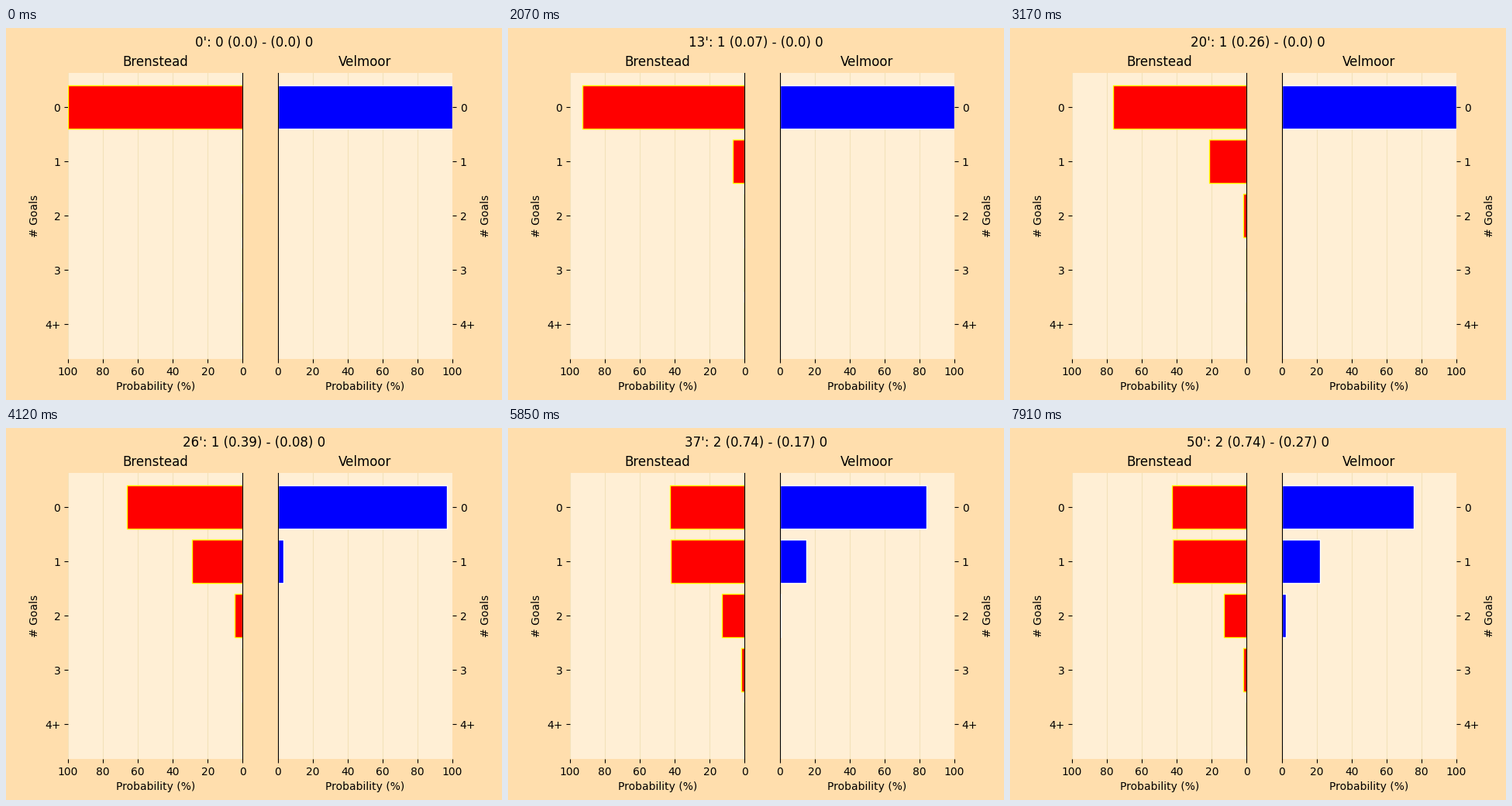
Recreate the animation shown at these times as a matplotlib script. Size 640x480 px, loop 8000 ms.

```python
import numpy as np
import matplotlib.pyplot as plt
from matplotlib.animation import FuncAnimation

LOOP, STEP = 8000, 20
QUIET, TWEEN, PARTS = 160, 30, 5   # ms per quiet minute, ms per tween step
ROWS = 5

# (minute, side, chance, scored)
SHOTS = [
    (10, 0, 0.070, True),
    (16, 0, 0.061, False),
    (18, 0, 0.126, False),
    (24, 0, 0.133, False),
    (24, 1, 0.020, False),
    (26, 1, 0.060, False),
    (28, 0, 0.354, True),
    (36, 1, 0.087, False),
    (42, 1, 0.018, False),
    (46, 1, 0.0835, False),
]
BUSY = {shot[0] for shot in SHOTS}


def goal_odds(minute, side):
    """Chance in percent of 0, 1, 2, 3 and 4+ goals up to a minute."""
    odds = np.array([1.0])
    for m, s, p, _ in SHOTS:
        if s == side and m <= minute:
            odds = np.convolve(odds, [1 - p, p])
    odds = np.pad(odds, (0, ROWS))
    return 100 * np.append(odds[:ROWS - 1], odds[ROWS - 1:].sum())


def tally(minute, side):
    shots = [s for s in SHOTS if s[1] == side and s[0] <= minute]
    goals = sum(s[3] for s in shots)
    return goals, round(sum((s[2] for s in shots), 0.0), 2)


def clock(ms):
    """Minute of play and the share of its tween that is done."""
    minute = 0
    while True:
        length = TWEEN * PARTS if minute in BUSY else QUIET
        if ms < length:
            part = ms // TWEEN + 1 if minute in BUSY else PARTS
            return minute, part / PARTS
        ms -= length
        minute += 1


def style(ax, name, inner, outer):
    ax.set_facecolor("papayawhip")
    ax.set_title(name)
    ax.set_xlabel("Probability (%)")
    ax.set_ylabel("# Goals")
    ax.set_yticks(range(ROWS), ["0", "1", "2", "3", "4+"])
    ax.set_ylim(4.64, -0.64)
    ax.set_xlim((100, 0) if inner == "right" else (0, 100))
    ax.set_xticks(range(0, 101, 20))
    ax.yaxis.set_label_position(outer)
    ax.yaxis.set_ticks_position(outer)
    ax.set_axisbelow(True)
    ax.grid(axis="x", color="#f3e2b9")
    for side, spine in ax.spines.items():
        spine.set_visible(side == inner)


fig, axes = plt.subplots(1, 2, figsize=(6.4, 4.8), dpi=100,
                         facecolor="navajowhite")
style(axes[0], "Brenstead", "right", "left")
style(axes[1], "Velmoor", "left", "right")
bars = [
    ax.barh(range(ROWS), goal_odds(0, side), color=fill, edgecolor=edge)
    for side, (ax, fill, edge) in enumerate(
        zip(axes, ("red", "blue"), ("yellow", "white")))
]
headline = fig.suptitle("")


def update(i):
    minute, share = clock(i * STEP + STEP // 2)
    for side, group in enumerate(bars):
        old, new = goal_odds(minute - 1, side), goal_odds(minute, side)
        for bar, width in zip(group, old + (new - old) * share):
            bar.set_width(width)
    (g0, x0), (g1, x1) = tally(minute, 0), tally(minute, 1)
    headline.set_text(f"{minute}': {g0} ({x0}) - ({x1}) {g1}")
    return [headline, *bars[0], *bars[1]]


anim = FuncAnimation(fig, update, frames=LOOP // STEP, interval=STEP,
                     repeat=True, repeat_delay=0)
plt.show()
```
